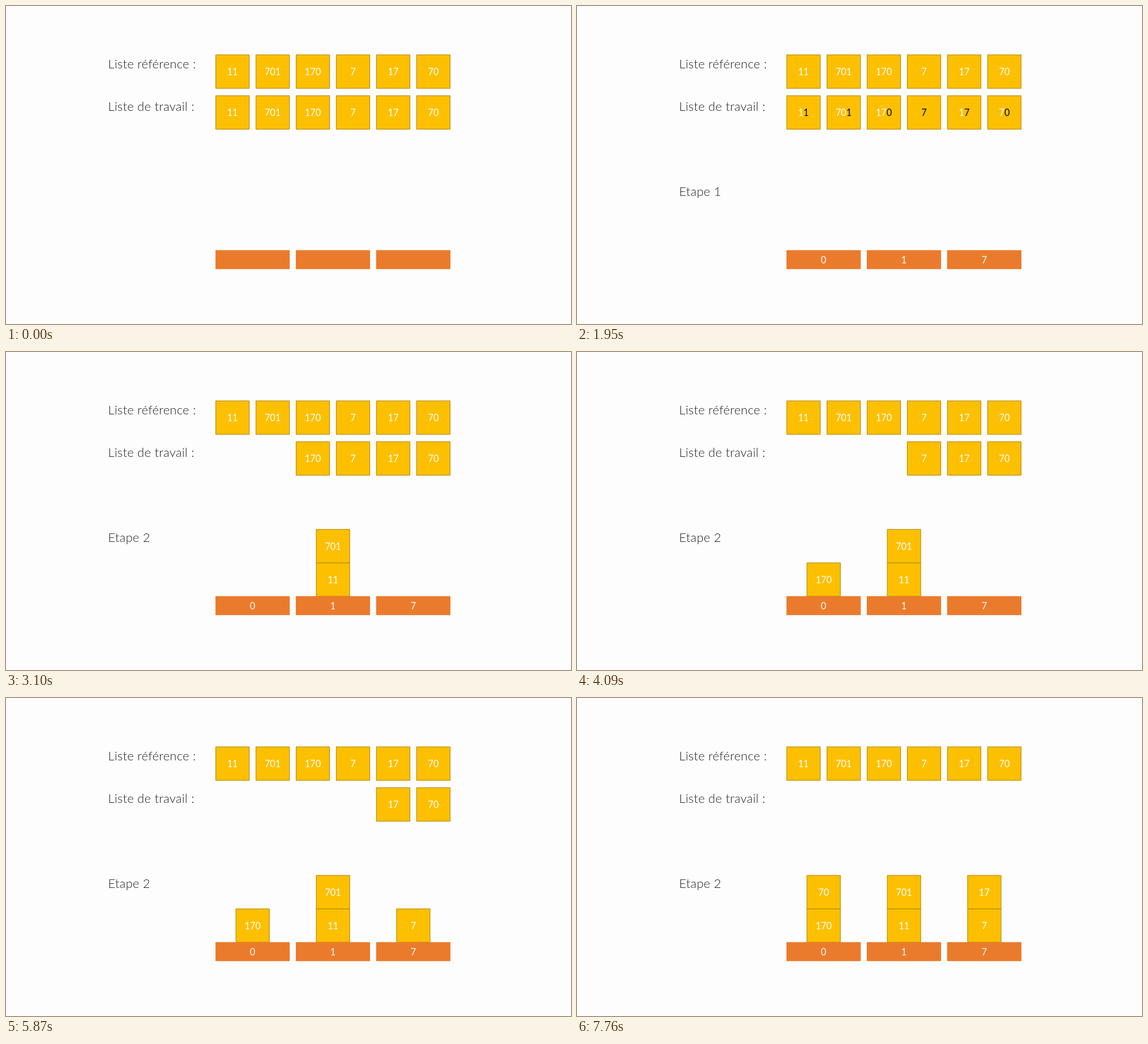
Recreate the animation shown at these times as an HTML page. Size 998 px wide and 561 px high, loop 8000 ms.

```html
<!DOCTYPE html>
<html lang="fr">
<head>
<meta charset="utf-8">
<title>Tri par base</title>
<style>
  html, body { margin: 0; width: 100%; height: 100%; overflow: hidden; background: #fdfdfd; }
  svg { display: block; width: 100%; height: 100%; font-family: Lato, sans-serif; }
  .label { font-size: 22px; font-weight: 300; letter-spacing: .25px; fill: #222; }
  .number { font-size: 16.3px; fill: #fff; text-anchor: middle; }
  .active { fill: #000; }
  .tile { fill: #fcc000; stroke: #bc8c00; stroke-width: 1.2; }
  .bucket { fill: #eb7b2c; }
</style>
</head>
<body>
<svg id="stage" viewBox="0 0 998 561"></svg>
<script>
const LOOP = 8000;
const STEP = 1023; // one slide
const values = [11, 701, 170, 7, 17, 70];
const digits = [0, 1, 7];
const stage = document.getElementById('stage');

const label = (text, y) => `<text class="label" x="180.3" y="${y}">${text}</text>`;
const number = (content, x, y) => `<text class="number" x="${x}" y="${y}">${content}</text>`;

function tile(value, x, y, marked) {
  const text = String(value);
  const content = marked
    ? `${text.slice(0, -1)}<tspan class="active">${text.slice(-1)}</tspan>`
    : text;
  return `<rect class="tile" x="${x - 29.5}" y="${y}" width="59" height="59"/>` +
    number(content, x, y + 36);
}

function scene(slide) {
  const placed = Math.max(0, slide - 1);
  const heights = digits.map(() => 0);
  let out = label('Liste référence :', 110) + label('Liste de travail :', 185);
  if (slide > 0) out += label(`Etape ${slide > 1 ? 2 : 1}`, 334.5);

  values.forEach((value, i) => {
    const x = 400.1 + 70.96 * i;
    out += tile(value, x, 86.2);
    if (i >= placed) {
      out += tile(value, x, 158.3, slide === 1);
    } else {
      const column = digits.indexOf(value % 10);
      const level = ++heights[column];
      out += tile(value, 435.7 + 141.9 * column, 431 - 59 * level);
    }
  });

  digits.forEach((digit, i) => {
    const x = 435.6 + 141.9 * i;
    out += `<rect class="bucket" x="${x - 65.6}" y="430.7" width="131.2" height="33.5"/>`;
    if (slide > 0) out += number(digit, x, 454);
  });
  return out;
}

let shown = -1;
function draw(now) {
  const slide = Math.floor((now % LOOP + 3) / STEP);
  if (slide !== shown) stage.innerHTML = scene(shown = slide);
  requestAnimationFrame(draw);
}
draw(performance.now());
</script>
</body>
</html>
```
